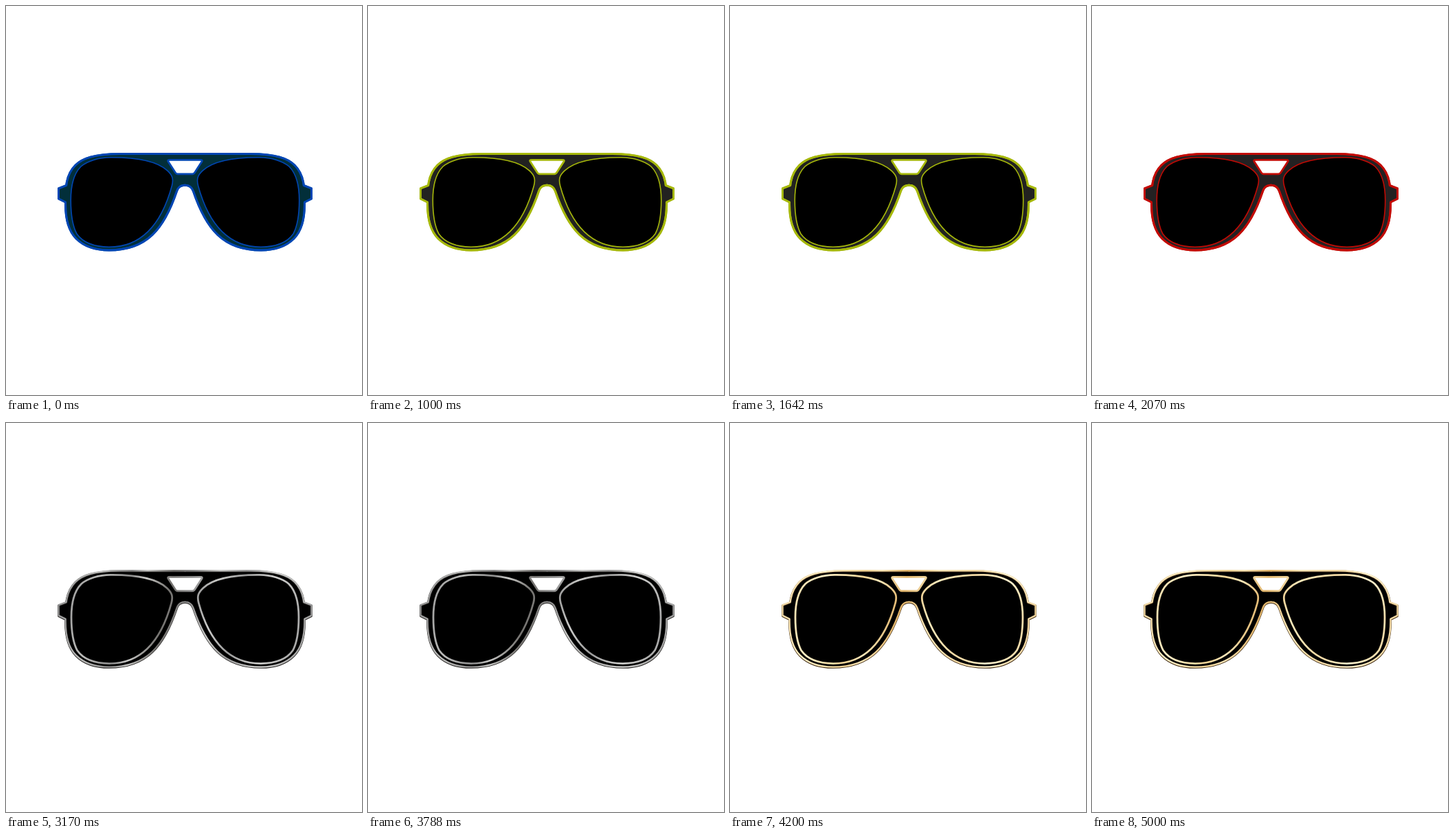
Write an HTML page that moves like this. It is 518 px wide and 567 px high and loops after 5.53 s.

```html
<!DOCTYPE html>
<html lang="en">
<head>
<meta charset="utf-8">
<title>Sunglasses</title>
<style>
  html, body { margin: 0; width: 100%; height: 100%; overflow: hidden; background: #fff; }
  svg { display: block; width: 100vw; height: 100vh; }
  path { stroke-linejoin: round; }
</style>
</head>
<body>
<svg viewBox="0 0 518 567" preserveAspectRatio="none">
  <defs>
    <linearGradient id="silver" gradientUnits="userSpaceOnUse" x1="80" y1="240" x2="440" y2="320">
      <stop offset="0" stop-color="#949494"/>
      <stop offset=".14" stop-color="#bcbcba"/>
      <stop offset=".26" stop-color="#8a8a8a"/>
      <stop offset=".32" stop-color="#c8c8c6"/>
      <stop offset=".42" stop-color="#74726f"/>
      <stop offset=".5" stop-color="#8a8a8a"/>
      <stop offset=".6" stop-color="#cacac8"/>
      <stop offset=".7" stop-color="#9a9a9a"/>
      <stop offset=".82" stop-color="#d0d0ce"/>
      <stop offset="1" stop-color="#9c9c9c"/>
    </linearGradient>
    <linearGradient id="gold" gradientUnits="userSpaceOnUse" x1="80" y1="240" x2="440" y2="320">
      <stop offset="0" stop-color="#f0d8a4"/>
      <stop offset=".14" stop-color="#fbedc4"/>
      <stop offset=".3" stop-color="#f0d496"/>
      <stop offset=".36" stop-color="#f8e6b8"/>
      <stop offset=".46" stop-color="#dfb268"/>
      <stop offset=".58" stop-color="#f9e8ba"/>
      <stop offset=".72" stop-color="#f2d8a2"/>
      <stop offset=".85" stop-color="#fcf0cc"/>
      <stop offset="1" stop-color="#eed29a"/>
    </linearGradient>
  </defs>
  <g id="glasses"></g>
</svg>
<script>
const WIDTH = 521; // twice the mirror axis
const RIM = 'M 261.5 215.6 L 165 215.6 C 128 215.8 111 222 101 232 C 93 240 89 250 87.7 261.5 ' +
  'L 76.5 265.8 L 76.5 281 L 86.6 286 C 86 312 91 328 102 339 C 113 350 130 356 150 356 ' +
  'C 205 356 230 325 248.5 270 C 250.5 264 254 261.2 260.5 261.2 L 261.5 261.2';
const LENS = 'M 152 220.8 C 184 220.6 218 224.2 235 240.2 C 242 246.8 244 252 241.4 262 ' +
  'C 230.5 302 207 351.3 150 351.3 C 130 351 112 345 103 332 ' +
  'C 95.5 318 94.3 295 94.3 283 C 94.3 262 99 244 109 234 C 118 226 135 220.8 152 220.8 Z';
const HOLE = 'M 238 224.4 L 283 224.4 Q 286.5 224.4 284.8 227 L 274.5 243 ' +
  'Q 273.3 244.8 271.5 244.8 L 249.5 244.8 Q 247.7 244.8 246.5 243 L 236.2 227 Q 234.5 224.4 238 224.4 Z';

const mirror = d => d.replace(/([\d.]+) ([\d.]+)/g, (_, x, y) => `${WIDTH - x} ${y}`);

const tint = (line, fill) =>
  ({ line, fill, edge: line, width: 2.9, lensWidth: 1.6, inset: 1, drop: 0 });
const metal = (id, edge) =>
  ({ line: `url(#${id})`, fill: '#000', edge, width: 2.4, lensWidth: 2.8, inset: 0.99, drop: 0.35 });

const GOLD = metal('gold', '#3a240c');
const STEPS = [
  [1000, tint('#0046b4', '#022f3a')],
  [1070, tint('#a6b80a', '#222220')],
  [1100, tint('#c30a04', '#242122')],
  [1030, metal('silver', '#242220')],
  [800, GOLD],
  [530, GOLD]
];
const LOOP = STEPS.reduce((sum, [ms]) => sum + ms, 0);

const path = (d, fill, stroke, width, move = '') =>
  `<path d="${d}" fill="${fill}" stroke="${stroke}" stroke-width="${width}" transform="${move}"/>`;

function lens(d, cx, s) {
  const fit = `translate(${cx} 286) scale(${s.inset}) translate(${-cx} -286)`;
  return path(d, '#000', s.line, s.lensWidth, fit);
}

function draw(s) {
  const rims = [RIM, mirror(RIM)];
  return rims.map(d => path(d, s.fill, s.edge, 3, `translate(0 ${s.drop})`)).join('') +
    rims.map(d => path(d, 'none', s.line, s.width, `translate(0 ${-s.drop})`)).join('') +
    lens(LENS, 168.5, s) + lens(mirror(LENS), WIDTH - 168.5, s) +
    path(HOLE, '#fff', s.line, 2.8);
}

const glasses = document.getElementById('glasses');
let shown = null;

function styleAt(time) {
  let t = time % LOOP;
  for (const [ms, style] of STEPS) {
    if (t < ms) return style;
    t -= ms;
  }
  return STEPS[0][1];
}

const start = performance.now();
function tick(now) {
  const style = styleAt(Math.max(0, now - start));
  if (style !== shown) {
    glasses.innerHTML = draw(style);
    shown = style;
  }
  requestAnimationFrame(tick);
}
tick(start);
</script>
</body>
</html>
```
